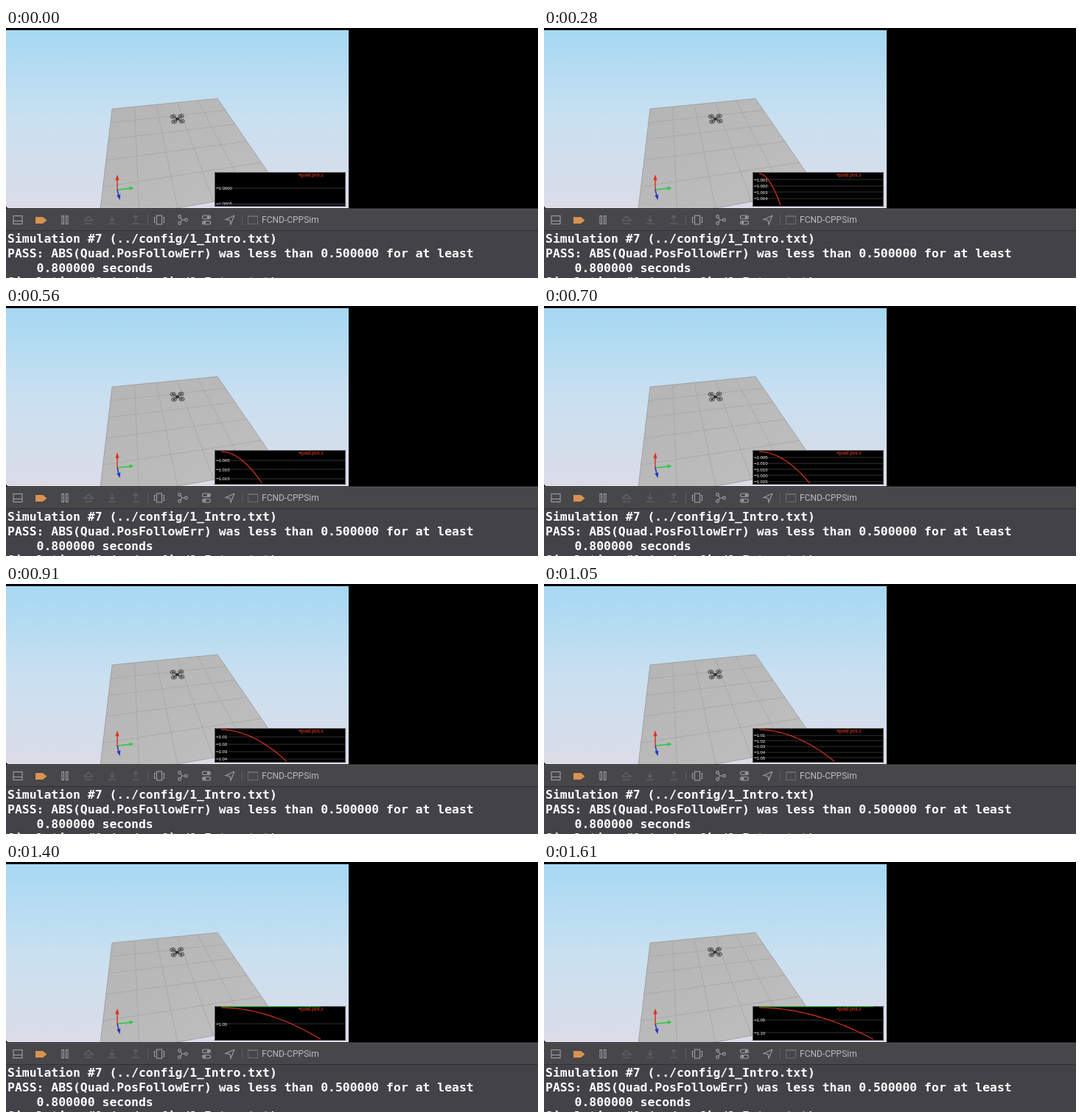
An HTML page with a canvas that plays this animation: 722 px wide and 340 px high, repeating every 1.68 s.

```html
<!DOCTYPE html>
<html lang="en">
<head>
<meta charset="utf-8">
<style>
  html, body { margin: 0; width: 100%; height: 100%; overflow: hidden; background: #000; }
  canvas { display: block; }
</style>
</head>
<body>
<canvas id="stage" width="722" height="340"></canvas>
<script>
const ctx = document.getElementById('stage').getContext('2d');
const STEP = 70, STEPS = 24;

function rect(x, y, w, h, color) {
  ctx.fillStyle = color;
  ctx.fillRect(x, y, w, h);
}

function trace(points, close) {
  ctx.beginPath();
  points.forEach(([x, y]) => ctx.lineTo(x, y));
  if (close) ctx.closePath();
}

function line(color, width, ...points) {
  trace(points);
  ctx.strokeStyle = color;
  ctx.lineWidth = width;
  ctx.stroke();
}

function shape(color, ...points) {
  trace(points, true);
  ctx.fillStyle = color;
  ctx.fill();
}

function text(str, x, y, font, color) {
  ctx.font = font;
  ctx.fillStyle = color;
  ctx.fillText(str, x, y);
}

// Perspective mapping of the unit square onto the floor.
function floorPoint(u, v) {
  const w = 1 + 0.0832 * u - 0.4474 * v;
  return [(144 + 166.9 * u - 74.4 * v) / w, (110 - 6 * u + 35.9 * v) / w];
}

function drawFloor() {
  const corners = [[0, 0], [1, 0], [1, 1], [0, 1]].map(c => floorPoint(...c));
  const shade = ctx.createLinearGradient(150, 100, 260, 245);
  shade.addColorStop(0, '#b5b5b6');
  shade.addColorStop(1, '#bdbdbe');
  shape(shade, ...corners);
  for (let i = 0; i <= 5; i++) {
    const s = i / 5, color = i % 5 ? '#a5a5a7' : '#979799';
    line(color, 0.8, floorPoint(s, 0), floorPoint(s, 1));
    line(color, 0.8, floorPoint(0, s), floorPoint(1, s));
  }
}

function arrow(color, dx, dy, head) {
  const x = 151, y = 220, len = Math.hypot(dx, dy);
  const ux = dx / len, uy = dy / len;
  const bx = x + dx - ux * head, by = y + dy - uy * head;
  line(color, 1.5, [x, y], [bx, by]);
  shape(color, [x + dx, y + dy], [bx - uy * 2.6, by + ux * 2.6], [bx + uy * 2.6, by - ux * 2.6]);
}

function drawDrone(progress) {
  ctx.save();
  ctx.translate(232.7 - 0.7 * progress, 123.8 - 1.2 * progress);
  line('#444446', 1.5, [-6, -3.6], [6, 3]);
  line('#444446', 1.5, [-4.5, 3.6], [4.8, -3.6]);
  shape('#303032', [-2.5, -1], [0, -2.2], [2.5, -0.5], [1.5, 2], [-2, 1.8]);
  for (const [x, y] of [[-6, -3.5], [5, -4], [-4.5, 3.5], [6, 3]]) {
    ctx.beginPath();
    ctx.ellipse(x, y, 3.6, 2.5, -0.1, 0, 7);
    ctx.fillStyle = 'rgba(130,130,132,.55)';
    ctx.fill();
    ctx.lineWidth = 1;
    ctx.strokeStyle = '#4b4b4d';
    ctx.stroke();
    rect(x - 1, y - 1, 2, 2, '#39393b');
  }
  ctx.restore();
}

function gridLine(y, value, digits) {
  rect(284, Math.round(y) - 0.5, 176, 1, '#323234');
  line('#ddd', 0.9, [285.5, y], [288.5, y]);
  text(value.toFixed(digits), 288.5, y + 2.2, '6px "Liberation Sans", sans-serif', '#f2f2f2');
}

function drawPlot(k) {
  rect(283, 196, 178, 47, '#55565a');
  rect(284, 197, 176, 45, '#000');
  ctx.save();
  ctx.beginPath();
  ctx.rect(284, 196, 176, 46);
  ctx.clip();
  const left = 292, top = 198, height = 43;
  if (k === 0) {
    gridLine(217.5, 1, 4);
    gridLine(239, 1.0005, 4);
    rect(284, 240, 176, 1, '#302448');
  } else {
    // Free fall: the vertical axis always spans the whole drop so far.
    const span = 2.5 + 6.62 * k;
    const drop = 8.21e-6 * span ** 1.91;
    const step = [1e-4, 5e-4, 1e-3, 5e-3, 0.01, 0.05].find(s => drop / s <= 7.2);
    const digits = Math.ceil(-Math.log10(step) - 1e-9);
    for (let i = 1; i * step < drop * 0.97; i++) {
      gridLine(top + height * i * step / drop, 1 + i * step, digits);
    }
    const curve = [];
    for (let i = 0; i <= 40; i++) {
      curve.push([left + span * i / 40, top + height * (i / 40) ** 1.91]);
    }
    line('#d8321c', 1.2, ...curve);
    if (k >= 18) rect(left, 196, span, 1.2, '#20b52c');
  }
  line('#e03a1d', 1, [397, 199.5], [400, 199.5]);
  text('quad.pos.z', 399, 202, '6.5px "Liberation Sans", sans-serif', '#f0401f');
  ctx.restore();
}

function drawToolbar() {
  rect(0, 245, 722, 1, '#29282b');
  rect(0, 246, 722, 29, '#474649');
  rect(0, 246, 722, 1, '#555457');
  rect(0, 275, 722, 1, '#302f33');
  const grey = '#a09fa2', dim = '#69686b';
  ctx.strokeStyle = grey;
  ctx.lineWidth = 1.1;
  ctx.strokeRect(10, 255.5, 12, 11);
  line(grey, 1.1, [10, 262.5], [22, 262.5]);
  shape('#d99250', [40, 257], [50, 257], [55.5, 261.5], [50, 266], [40, 266]);
  ctx.strokeStyle = grey;
  ctx.strokeRect(76, 255.5, 2.5, 11);
  ctx.strokeRect(81.5, 255.5, 2.5, 11);
  line(dim, 1.1, [106, 262], [112, 256], [118, 262], [106, 262]);
  line(dim, 1.1, [107, 266], [117, 266]);
  for (const [x, tip, dir] of [[144, 263, -1], [176, 255, 1]]) {
    line(dim, 1.1, [x, 255], [x, 263]);
    line(dim, 1.1, [x - 3, tip + 3 * dir], [x, tip], [x + 3, tip + 3 * dir]);
    line(dim, 1.1, [x - 5, 266], [x + 5, 266]);
  }
  rect(192, 254, 1, 14, '#5e5d60');
  rect(320, 254, 1, 14, '#5e5d60');
  ctx.strokeStyle = grey;
  ctx.lineWidth = 1.1;
  ctx.strokeRect(204.5, 255, 7, 12);
  line(grey, 1.1, [203, 257.5], [201.5, 257.5], [201.5, 264.5], [203, 264.5]);
  line(grey, 1.1, [213, 257.5], [214.5, 257.5], [214.5, 264.5], [213, 264.5]);
  line(grey, 1.1, [236, 257], [239, 261], [244, 261]);
  line(grey, 1.1, [239, 261], [236, 265]);
  for (const [x, y] of [[235.5, 256.5], [244.5, 261], [235.5, 265.5]]) {
    ctx.beginPath();
    ctx.arc(x, y, 1.9, 0, 7);
    ctx.fillStyle = '#474649';
    ctx.fill();
    ctx.stroke();
  }
  for (const [y, knob] of [[255, 274.5], [262.5, 269.5]]) {
    ctx.beginPath();
    ctx.roundRect(266.5, y, 11, 4.5, 2.2);
    ctx.stroke();
    ctx.beginPath();
    ctx.arc(knob, y + 2.2, 1.8, 0, 7);
    ctx.fillStyle = grey;
    ctx.fill();
  }
  line(grey, 1.1, [310, 255], [298, 260.5], [304, 261.5], [305, 267], [310, 255]);
  ctx.strokeStyle = dim;
  ctx.strokeRect(328.5, 255.5, 13, 11);
  rect(328, 255, 14, 2, dim);
  text('FCND-CPPSim', 347, 265.3, '12px Roboto, sans-serif', '#bab9bc');
}

function drawConsole() {
  rect(0, 276, 722, 64, '#434248');
  const lines = [
    'Simulation #7 (../config/1_Intro.txt)',
    'PASS: ABS(Quad.PosFollowErr) was less than 0.500000 for at least',
    '    0.800000 seconds',
    'Simulation #8 (../config/1_Intro.txt)'
  ];
  lines.forEach((str, i) =>
    text(str, 2, 292 + 20 * i - (i === 3 ? 1.5 : 0), 'bold 16.43px "DejaVu Sans Mono", monospace', '#fff'));
}

function draw(k) {
  rect(0, 0, 722, 340, '#000');
  const sky = ctx.createLinearGradient(0, 3, 0, 245);
  sky.addColorStop(0, '#a6d8f3');
  sky.addColorStop(0.5, '#c9e0f0');
  sky.addColorStop(1, '#dcdce8');
  ctx.save();
  ctx.beginPath();
  ctx.roundRect(0, 3, 465, 242, [0, 0, 0, 4]);
  ctx.clip();
  rect(0, 3, 465, 242, sky);
  drawFloor();
  arrow('#28c83c', 22.5, -2.5, 6);
  arrow('#2038b8', 3.5, 14, 7);
  arrow('#dc3322', 0, -21, 8);
  drawDrone((k / (STEPS - 1)) ** 1.5);
  drawPlot(k);
  ctx.restore();
  drawToolbar();
  drawConsole();
}

function tick() {
  draw(Math.floor(performance.now() / STEP) % STEPS);
  requestAnimationFrame(tick);
}
tick();
</script>
</body>
</html>
```
